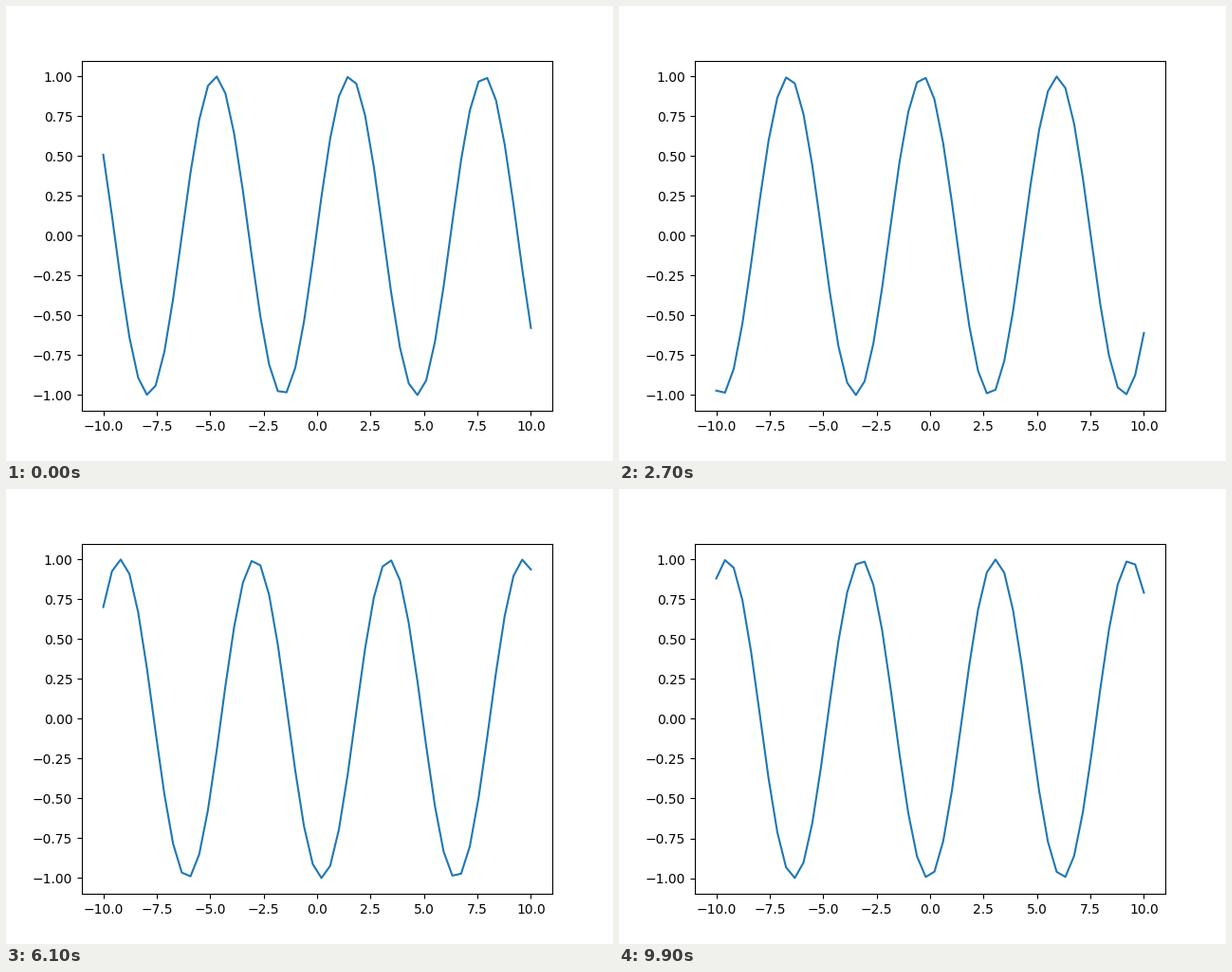
Write a matplotlib script that moves like this. It is 640x480 px and loops after 10 s.

```python
import numpy as np
import matplotlib.pyplot as plt
from matplotlib.animation import FuncAnimation

FRAMES = 100
INTERVAL = 100  # ms
PHASE = 0.0425  # radians at the start of the loop
STEP = 1.0      # radians per frame

x = np.linspace(-10, 10, 50)


def wave(i):
    return np.sin(x + PHASE + STEP * i)


fig, ax = plt.subplots(figsize=(6.4, 4.8), dpi=100)
line, = ax.plot(x, wave(0), color="#1f77b4", linewidth=1.5)


def update(i):
    line.set_ydata(wave(i))
    # The y limits follow the sampled extremes.
    ax.relim()
    ax.autoscale_view()
    return line,


def init():
    return update(0)


anim = FuncAnimation(fig, update, frames=FRAMES, init_func=init,
                     interval=INTERVAL, repeat=True, repeat_delay=0, blit=False)

plt.show()
```
